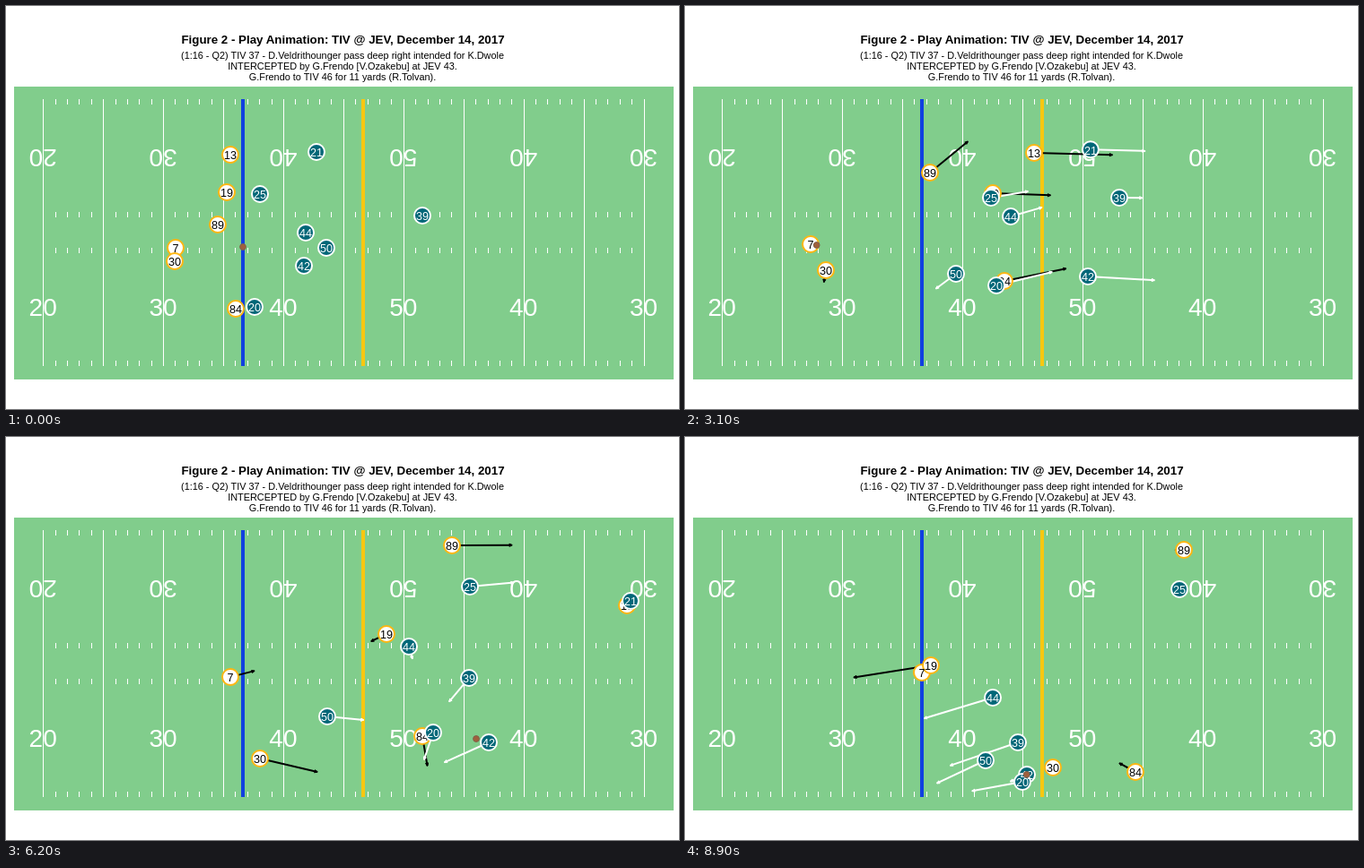
An HTML page for the animation above (9000 ms loop, 750 by 450 pixels).

```html
<!DOCTYPE html>
<html lang="en">
<head>
<meta charset="utf-8">
<title>Play animation</title>
<style>
  html, body { margin: 0; width: 100%; height: 100%; overflow: hidden; background: #fff; }
  svg { display: block; width: 750px; height: 450px; }
  text { font-family: "Liberation Sans", Arial, sans-serif; text-anchor: middle; }
  .title { font-size: 13.33px; font-weight: bold; }
  .note { font-size: 10.9px; }
  .yards { font-size: 28px; fill: #fff; }
  .number { font-size: 12.6px; }
</style>
</head>
<body>
<svg id="stage" viewBox="0 0 750 450"></svg>
<script>
const LOOP = 9000, STEP = 100;
const SNAP = 950, THROW = 4900, CATCH = 6150;
const TIMES = [SNAP, 2000, 3100, 4800, 6200, 7000, 8900, 9900];
const FIELD = { left: 41.185, right: 711, top: 104, bottom: 402, yard: 13.387 };
const TEAMS = {
  offense: { fill: '#fff', ring: '#ffb612', ink: '#000', arrow: '#000' },
  defense: { fill: '#006778', ring: '#fff', ink: '#fff', arrow: '#fff' }
};

const stage = document.getElementById('stage');

function add(parent, tag, attrs = {}, content = '') {
  const node = document.createElementNS('http://www.w3.org/2000/svg', tag);
  for (const key in attrs) node.setAttribute(key, attrs[key]);
  node.textContent = content;
  return parent.appendChild(node);
}

function drawTitles() {
  add(stage, 'text', { class: 'title', x: 375.5, y: 42 },
    'Figure 2 - Play Animation: TIV @ JEV, December 14, 2017');
  [
    '(1:16 - Q2) TIV 37 - D.Veldrithounger pass deep right intended for K.Dwole',
    'INTERCEPTED by G.Frendo [V.Ozakebu] at JEV 43.',
    'G.Frendo to TIV 46 for 11 yards (R.Tolvan).'
  ].forEach((line, i) => add(stage, 'text', { class: 'note', x: 375, y: 59 + 12 * i }, line));
}

function drawField() {
  add(stage, 'rect', { x: 9, y: 90, width: 735, height: 327, fill: '#81cd8c' });
  let lines = '';
  for (let yard = 0; yard <= 50; yard++) {
    const x = Math.round(FIELD.left + yard * FIELD.yard) + 0.5;
    if (yard % 5 === 0) lines += `M${x} ${FIELD.top}V${FIELD.bottom}`;
    else for (const y of [104, 230, 270, 396]) lines += `M${x} ${y}v6`;
  }
  add(stage, 'path', { d: lines, stroke: '#fff' });
  for (let yard = 20; yard <= 70; yard += 10) {
    const x = FIELD.left + (yard - 20) * FIELD.yard, label = 50 - Math.abs(50 - yard);
    add(stage, 'text', { class: 'yards', x, y: 346 }, label);
    add(stage, 'text', { class: 'yards', transform: `translate(${x} 159.5) rotate(180)` }, label);
  }
  add(stage, 'path', { d: 'M264 104V402', stroke: '#1140e0', 'stroke-width': 4 });
  add(stage, 'path', { d: 'M398 104V402', stroke: '#f8c711', 'stroke-width': 4 });
}

drawTitles();
drawField();

const mix = (a, b, u) => a + (b - a) * u;
const mixPoint = (p, q, u) => [mix(p[0], q[0], u), mix(p[1], q[1], u)];
const clamp = u => Math.max(0, Math.min(1, u));

// A smooth curve through one coordinate of the waypoints, starting from rest.
function spline(values) {
  const last = values.length - 1;
  const span = i => (TIMES[i + 1] - TIMES[i]) / 1000;
  const slope = i => (values[i + 1] - values[i]) / span(i);
  const speeds = [0];
  for (let i = 1; i < last; i++)
    speeds[i] = mix(slope(i - 1), slope(i), span(i - 1) / (span(i - 1) + span(i)));
  speeds[last] = 1.5 * slope(last - 1) - 0.5 * speeds[last - 1];

  return time => {
    const t = Math.max(time, SNAP);
    let i = 0;
    while (i < last && t >= TIMES[i + 1]) i++;
    const elapsed = (t - TIMES[i]) / 1000;
    if (i === last) return values[i] + speeds[i] * elapsed;
    const u = elapsed / span(i), d = values[i + 1] - values[i];
    const m = speeds[i] * span(i), n = speeds[i + 1] * span(i);
    return values[i] + u * (m + u * (3 * d - 2 * m - n + u * (m + n - 2 * d)));
  };
}

// Waypoints are "x,y" pairs, one for each of TIMES.
function route(...points) {
  const x = spline(points.map(p => p[0])), y = spline(points.map(p => p[1]));
  return t => [x(t), y(t)];
}

// A cover man closes in on the receiver he follows.
function cover(receiver, from, to) {
  return t => {
    const u = clamp((t - SNAP) / (6200 - SNAP));
    const gap = mixPoint(from, to, (1 - Math.cos(Math.PI * u)) / 2);
    return receiver(t).map((value, i) => value + gap[i]);
  };
}

const arrows = add(stage, 'g');
const layers = {};
for (const team in TEAMS) layers[team] = { discs: add(stage, 'g'), labels: add(stage, 'g') };
const players = [];

function addPlayer(team, number, path) {
  const { fill, ring, ink, arrow: color } = TEAMS[team];
  const arrow = add(arrows, 'g', { stroke: color, fill: color });
  players.push({
    path, arrow,
    disc: add(layers[team].discs, 'circle', { r: 9, fill, stroke: ring, 'stroke-width': 2 }),
    label: add(layers[team].labels, 'text', { class: 'number', y: 5.4, fill: ink }, number),
    shaft: add(arrow, 'path', { 'stroke-width': 2 }),
    head: add(arrow, 'path', { d: 'M0 0L-3 -1.5V1.5Z', 'stroke-linejoin': 'round' })
  });
  return path;
}

const deepReceiver = addPlayer('offense', 13,
  route([250, 166], [291, 165], [389, 164], [533, 176], [692, 188]));
const passer = addPlayer('offense', 7,
  route([189, 270], [172, 268], [140, 266], [180, 276], [250, 268], [261, 262], [264, 263]));
addPlayer('offense', 84,
  route([256, 338], [282, 327], [356, 307], [476, 295], [464, 334], [475, 363], [502, 374], [467, 356]));
addPlayer('offense', 19,
  route([246, 208], [265, 209], [343, 209], [435, 219], [424, 220], [406, 230], [274, 255]));
addPlayer('offense', 89,
  route([236, 244], [240, 226], [273, 186], [377, 131], [497, 121], [542, 124], [556, 126]));
addPlayer('offense', 30,
  route([188, 285], [181, 285], [157, 295], [205, 329], [283, 359], [338, 368], [410, 369], [390, 369]));

addPlayer('defense', 21, cover(deepReceiver, [96, -3], [4, -5]));
addPlayer('defense', 25,
  route([283, 210], [302, 213], [341, 214], [427, 181], [517, 167], [549, 166], [551, 170], [551, 169]));
addPlayer('defense', 39,
  route([464, 234], [456, 222], [484, 214], [528, 234], [516, 269], [492, 291], [371, 341]));
addPlayer('defense', 44,
  route([334, 253], [331, 250], [363, 235], [437, 227], [449, 234], [450, 249], [343, 291]));
addPlayer('defense', 50,
  route([357, 270], [343, 278], [302, 299], [303, 321], [358, 312], [391, 320], [335, 361]));
const catcher = addPlayer('defense', 42,
  route([332, 290], [361, 294], [449, 302], [560, 301], [538, 341], [483, 356], [381, 377], [381, 383]));
addPlayer('defense', 20,
  route([277, 336], [288, 330], [347, 312], [475, 290], [476, 330], [463, 355], [376, 385]));

const ball = add(stage, 'circle', { r: 3.4, fill: '#a0603c', stroke: '#80604c' });

// The passer swings the ball back and forth; the catcher pulls it in.
function passerBall(t) {
  const [x, y] = passer(t);
  return [x + 2 + 6 * Math.cos((t - 3400) / 2800 * 2 * Math.PI), y + 1];
}

function catcherBall(t) {
  const [x, y] = catcher(t), reach = Math.exp((6200 - t) / 700);
  return [x - 14 * reach, y - 4 * reach];
}

function ballAt(t) {
  if (t < THROW) return mixPoint([264, 269], passerBall(t), clamp((t - SNAP) / 750));
  if (t < CATCH) return mixPoint(passerBall(THROW), catcherBall(CATCH), (t - THROW) / (CATCH - THROW));
  return catcherBall(t);
}

const inField = ([x, y]) =>
  x >= FIELD.left && x <= FIELD.right && y >= FIELD.top && y <= FIELD.bottom;

const show = (node, visible) => node.setAttribute('visibility', visible ? 'visible' : 'hidden');

// Each arrow spans the distance covered in one second at the current speed.
function render(time) {
  for (const { path, arrow, disc, label, shaft, head } of players) {
    const place = path(time), before = path(time - 5), after = path(time + 5);
    const [vx, vy] = after.map((value, i) => (value - before[i]) * 100);
    const tip = [place[0] + vx, place[1] + vy];
    const visible = inField(place);
    for (const node of [disc, label]) {
      show(node, visible);
      node.setAttribute('transform', `translate(${place})`);
    }
    show(arrow, visible && Math.hypot(vx, vy) > 1 && inField(tip));
    shaft.setAttribute('d', `M${place}L${tip}`);
    head.setAttribute('transform', `translate(${tip}) rotate(${Math.atan2(vy, vx) * 180 / Math.PI})`);
  }
  ball.setAttribute('transform', `translate(${ballAt(time)})`);
}

const began = performance.now();
function tick() {
  const time = (performance.now() - began) % LOOP;
  render(Math.floor(time / STEP) * STEP);
  requestAnimationFrame(tick);
}
tick();
</script>
</body>
</html>
```
